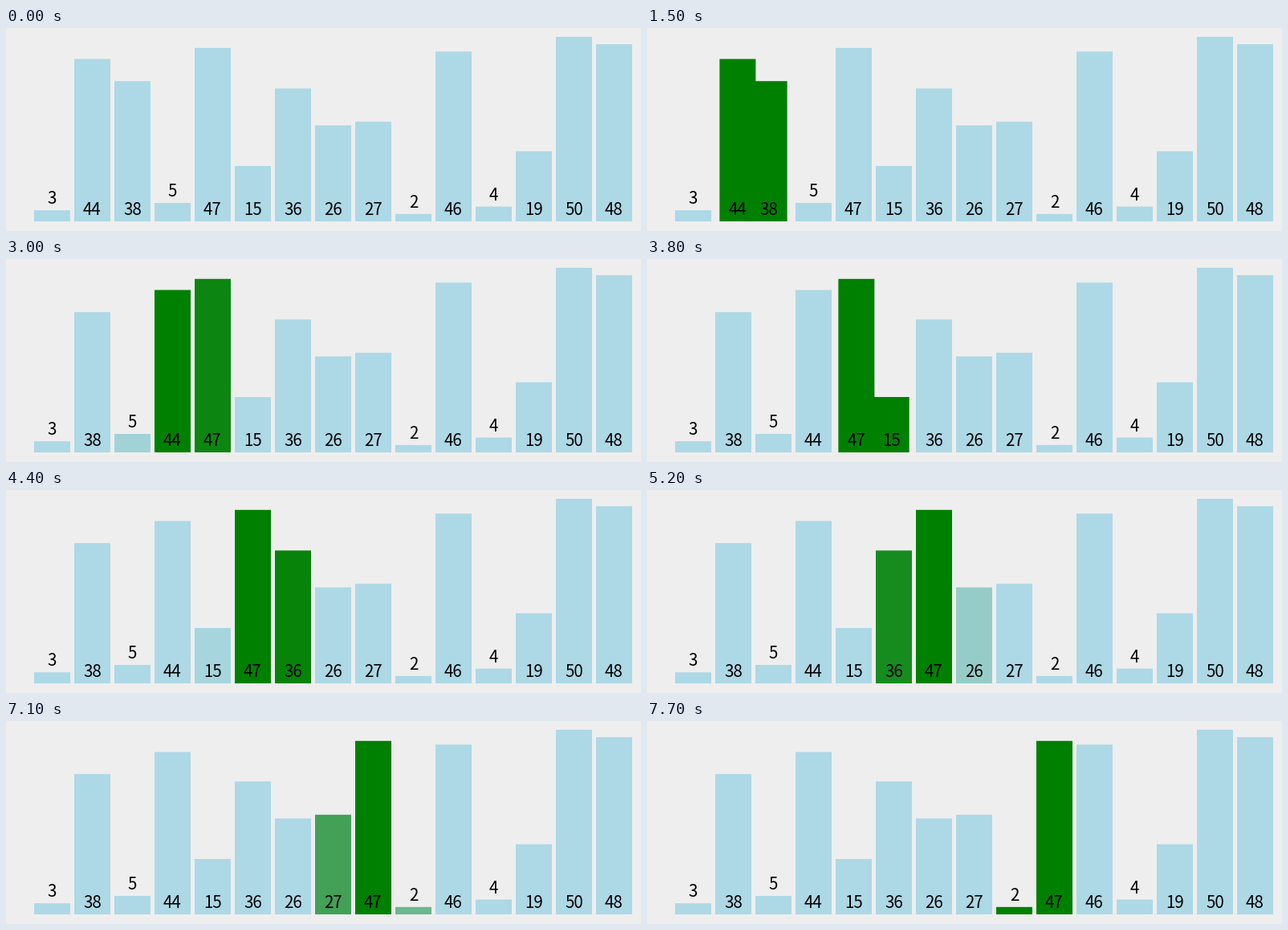
A matplotlib script for the animation above (8000 ms loop, 791x253 px).

```python
import numpy as np
import matplotlib.pyplot as plt
from matplotlib.animation import FuncAnimation
from matplotlib.patches import Rectangle

W, H, DPI = 791, 253, 64
STEP, FRAMES = 100, 80
VALUES = [3, 44, 38, 5, 47, 15, 36, 26, 27, 2, 46, 4, 19, 50, 48]
BAR_W, PITCH, LEFT, BASE, UNIT = 45, 50, 35, 241, 4.6
FONT_PX = 20.5
BLUE = np.array([173, 216, 230]) / 255
GREEN = np.array([0, 128, 0]) / 255

# Start of each transition in ms; the timer ticks about every 463 ms.
STARTS = [498, 961, 1425, 1888, 2351, 2815, 3278, 3736,
          4203, 4667, 5120, 5595, 6059, 6522, 6986, 7449]
DURATION = 250


def sort_events(values, count):
    """First bubble pass as lists of (property, bar, end value)."""
    order = list(range(len(values)))
    events = []
    for j in range(len(values) - 1):
        if j == 0:
            events.append([("lit", order[0], 1), ("lit", order[1], 1)])
        else:
            events.append([("lit", order[j - 1], 0), ("lit", order[j + 1], 1)])
        a, b = order[j], order[j + 1]
        if values[a] > values[b]:
            order[j], order[j + 1] = b, a
            events.append([("slot", a, j + 1), ("slot", b, j)])
    return events[:count]


def ease(p):
    p = min(max(p, 0), 1)
    return 4 * p**3 if p < 0.5 else 1 - 4 * (1 - p)**3


EVENTS = sort_events(VALUES, len(STARTS))

fig = plt.figure(figsize=(W / DPI, H / DPI), dpi=DPI, facecolor="#eeeeee")
ax = fig.add_axes([0, 0, 1, 1])
ax.set_xlim(0, W)
ax.set_ylim(H, 0)
ax.axis("off")

bars, labels = [], []
for i, v in enumerate(VALUES):
    x, top = LEFT + PITCH * i, BASE - UNIT * v
    bar = Rectangle((x, top), BAR_W, UNIT * v, lw=0, fc=BLUE,
                    zorder=i + 1, snap=False)
    bars.append(ax.add_patch(bar))
    baseline = (top if v < 10 else BASE) - 8
    labels.append(ax.text(x + BAR_W / 2, baseline, str(v), color="black",
                          family="Noto Sans CJK JP", size=FONT_PX * 72 / DPI,
                          ha="center", va="baseline", zorder=i + 1.5))


def draw(frame):
    t = frame * STEP
    state = {"slot": np.arange(len(VALUES), dtype=float),
             "lit": np.zeros(len(VALUES))}
    for start, changes in zip(STARTS, EVENTS):
        p = ease((t - start) / DURATION)
        for prop, bar, end in changes:
            state[prop][bar] += (end - state[prop][bar]) * p
    for bar, label, slot, lit in zip(bars, labels, state["slot"], state["lit"]):
        x = LEFT + PITCH * slot
        bar.set_x(x)
        bar.set_facecolor(BLUE + (GREEN - BLUE) * lit)
        label.set_x(x + BAR_W / 2)
    return bars + labels


anim = FuncAnimation(fig, draw, frames=FRAMES, interval=STEP,
                     repeat=True, repeat_delay=0, blit=False)
plt.show()
```
